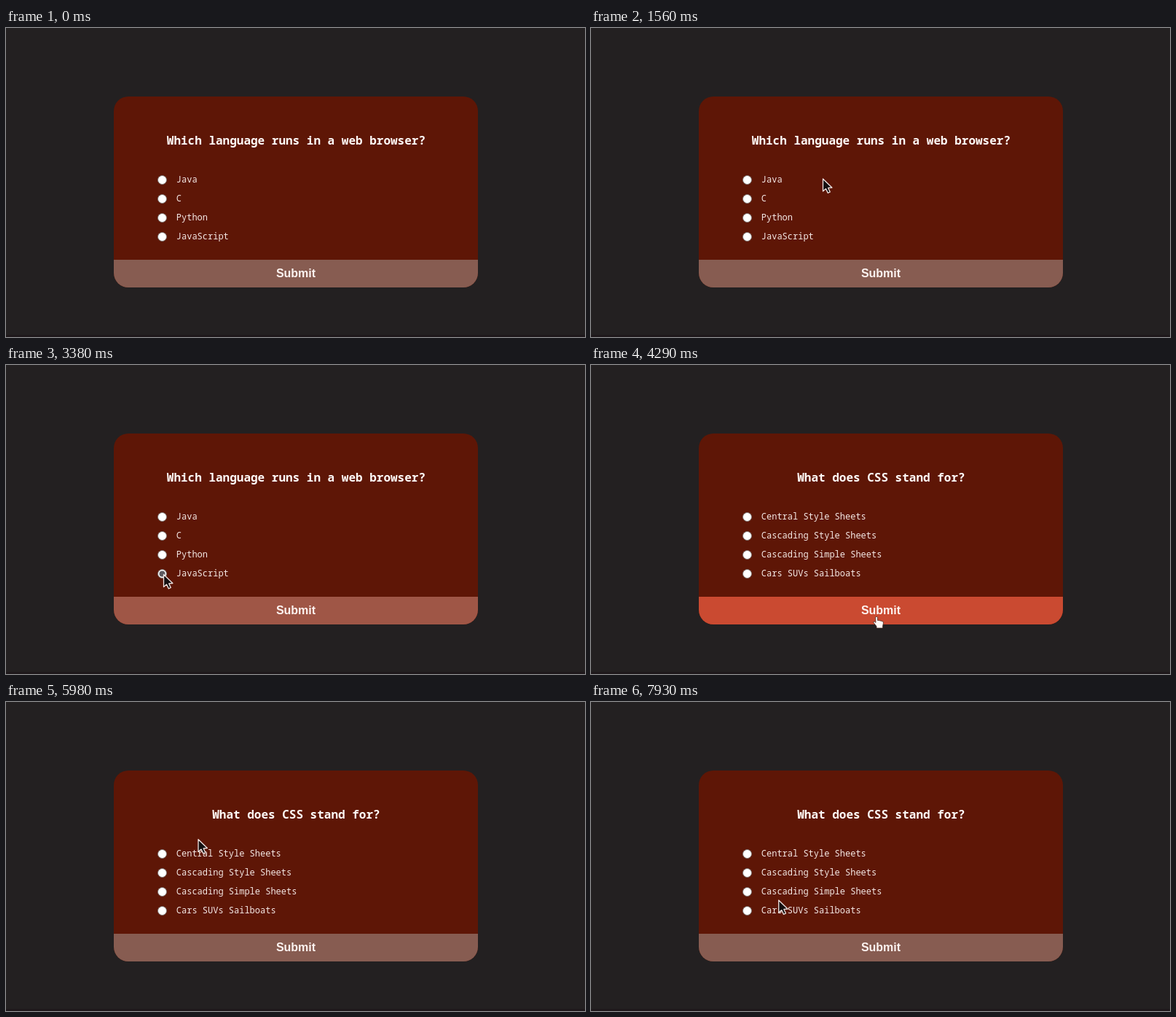
Recreate the animation shown at these times as an HTML page. Size 795x424 px, loop 8 s.

```html
<!DOCTYPE html>
<html lang="en">
<head>
<meta charset="utf-8">
<title>Quiz</title>
<style>
  html, body { margin: 0; width: 100%; height: 100%; overflow: hidden; background: #232021; }
  svg { display: block; }
  .mono { font-family: "Noto Sans Mono", "DejaVu Sans Mono", monospace; }
  #question { font-size: 16px; font-weight: 700; fill: #fffaf8; }
  .option { font-size: 12px; fill: #f5e9e6; }
  #submit { font: 700 16px "Liberation Sans", Arial, sans-serif; fill: #fdf3f0; }
</style>
</head>
<body>
<svg width="795" height="424" viewBox="0 0 795 424">
  <rect width="795" height="424" fill="#232021"/>
  <rect y="421" width="795" height="3" fill="#1e181b"/>
  <rect x="148" y="94" width="500" height="262" rx="20" fill="#5e1606"/>
  <path id="button" d="M148 318H648V336a20 20 0 0 1 -20 20H168a20 20 0 0 1 -20 -20Z"/>
  <text id="question" class="mono" x="398.4" y="160" text-anchor="middle"></text>
  <g id="options"></g>
  <text id="submit" x="398" y="342" text-anchor="middle">Submit</text>
  <path id="arrow" d="M0 0V17L4 13.6L6.8 19.4L9.8 18L7.2 12.4L12.4 12Z"
    fill="#151011" stroke="#eee3e1" stroke-width="1.3" stroke-linejoin="round"/>
  <path id="hand" d="M-1.4 1.2Q0 -.8 1.5 1.2V5.4L3.4 5.5L5.4 6L7.5 6.5Q9.7 6.8 9.5 9L8.6 13V16H0V13.6L-4 8.6Q-4.4 6.6 -2.6 7L-1 8.5Z"
    fill="#fff8f4" stroke="#3a1d18" stroke-width=".7" stroke-linejoin="round"/>
</svg>
<script>
const LOOP = 8000, START = 520, STEP = 130, FADE = 280;
const CLICK = 3380, NEXT = 4160, LEAVE = 4680, RETURN = 5200;

const quiz = [
  { title: "Which language runs in a web browser?",
    options: ["Java", "C", "Python", "JavaScript"] },
  { title: "What does CSS stand for?",
    options: ["Central Style Sheets", "Cascading Style Sheets",
              "Cascading Simple Sheets", "Cars SUVs Sailboats"] }
];

// pointer tip: time, x, y
const path = [
  [START, 90, 404], [910, 244, 145], [1170, 314, 128], [1560, 318.5, 207],
  [2730, 258, 286], [3120, 213, 323], [CLICK, 216.5, 287.5],
  [3900, 388, 345], [4290, 392, 345], [4550, 390, 350],
  [RETURN, 316, 240], [5590, 276, 123], [5980, 264, 188.5], [LOOP, 257.5, 275]
];

// when the pointer enters and leaves the button
const visits = [[2990, 3200], [3640, 4320]];

const $ = id => document.getElementById(id);
const clamp = v => Math.max(0, Math.min(1, v));
const mix = (a, b, k) => a.map((v, i) => v + (b[i] - v) * k);

function pointer(t) {
  const i = Math.max(1, path.findIndex(p => p[0] >= t));
  const a = path[i - 1], b = path[i];
  return mix(a, b, clamp((t - a[0]) / (b[0] - a[0]))).slice(1);
}

const hover = t => Math.max(...visits.map(([enter, leave]) =>
  Math.min(clamp((t - enter) / FADE), clamp(1 - (t - leave) / FADE))));

function add(tag, attrs) {
  const el = document.createElementNS("http://www.w3.org/2000/svg", tag);
  for (const name in attrs) el.setAttribute(name, attrs[name]);
  return $("options").appendChild(el);
}

const rows = quiz[0].options.map((_, i) => {
  const cx = 214.5, cy = 208.5 + 26 * i;
  return {
    ring: add("circle", { cx, cy, r: 6, fill: "#fff", stroke: "#7a706e" }),
    dot: add("circle", { cx, cy, r: 4, fill: "#5c5a60" }),
    label: add("text", { x: 233.8, y: cy + 3.5, class: "mono option" })
  };
});

function show(el, visible) {
  el.style.display = visible ? "" : "none";
}

function render(time) {
  const t = time < START ? 0 : START + Math.floor((time - START) / STEP) * STEP;
  const page = quiz[t < NEXT ? 0 : 1];
  $("question").textContent = page.title;
  rows.forEach((row, i) => {
    row.label.textContent = page.options[i];
    show(row.dot, i === 3 && t >= CLICK && t < NEXT);
  });

  const color = mix([135, 92, 81], [202, 74, 49], hover(t)).map(Math.round);
  $("button").setAttribute("fill", `rgb(${color})`);

  const [x, y] = pointer(t);
  const shown = t >= START && t < LEAVE || t >= RETURN;
  const onButton = x > 148 && x < 648 && y > 318 && y < 356;
  for (const id of ["arrow", "hand"]) {
    $(id).setAttribute("transform", `translate(${x} ${y})`);
    show($(id), shown && onButton === (id === "hand"));
  }
}

const begin = performance.now();
function tick() {
  render((performance.now() - begin) % LOOP);
  requestAnimationFrame(tick);
}
tick();
</script>
</body>
</html>
```
